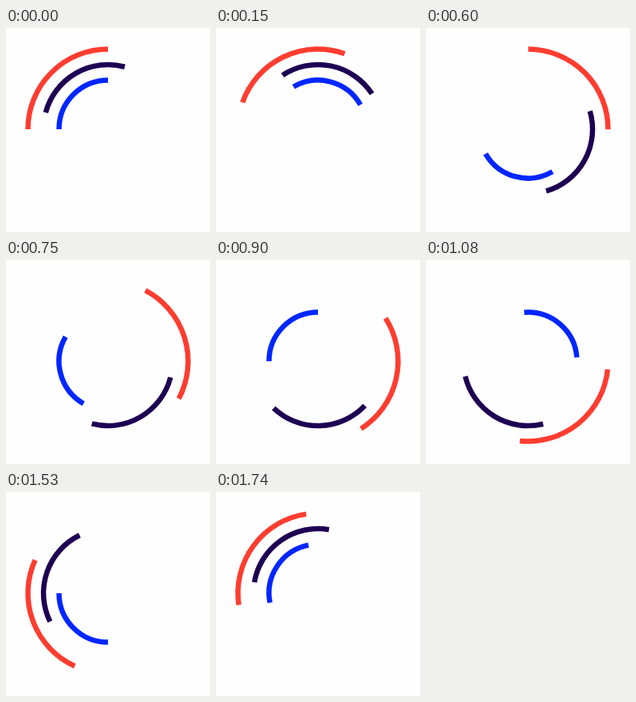
An HTML page for the animation above (1770 ms loop, 256 by 256 pixels).

```html
<!DOCTYPE html>
<html lang="en">
<head>
<meta charset="utf-8">
<title>Spinning arcs</title>
<style>
  html, body { margin: 0; width: 100%; height: 100%; overflow: hidden; background: #fefefe; }
  svg { display: block; width: 100%; height: 100%; }
  path { fill: none; stroke-width: 6.5; }
</style>
</head>
<body>
<svg id="stage" viewBox="0 0 256 256"></svg>
<script>
const LOOP = 1770, STEP = 30, CX = 128, CY = 127;

// Progress 0..1 with a bend: positive k starts fast, negative k starts slow.
const bend = (p, k, slope = 0) => p + p * (1 - p) * (k + slope * p);

// The inner arc makes one even turn, then a second one that slows down.
const twoTurns = t => t < 900 ? t / 900 : 1 + bend((t - 900) / (LOOP - 900), 0.21, -0.11);

const arcs = [
  { color: '#ff3d30', radius: 100.5, start: 180, turns: t => bend(t / LOOP, -0.395) },
  { color: '#1e0052', radius: 81, start: 195, turns: t => bend(t / LOOP, 0.425, -0.28) },
  { color: '#0026ff', radius: 61.5, start: 180, turns: twoTurns }
];

const stage = document.getElementById('stage');
for (const arc of arcs) {
  const { radius: r } = arc;
  arc.path = document.createElementNS('http://www.w3.org/2000/svg', 'path');
  arc.path.setAttribute('d', `M${CX + r} ${CY}A${r} ${r} 0 0 1 ${CX} ${CY + r}`);
  arc.path.setAttribute('stroke', arc.color);
  stage.append(arc.path);
}

function draw(time) {
  const t = Math.floor((time % LOOP) / STEP) * STEP;
  for (const { path, start, turns } of arcs) {
    path.setAttribute('transform', `rotate(${start + 360 * turns(t)} ${CX} ${CY})`);
  }
}

let origin;
function tick(now) {
  origin ??= now;
  draw(Math.max(0, now - origin));
  requestAnimationFrame(tick);
}
draw(0);
requestAnimationFrame(tick);
</script>
</body>
</html>
```
